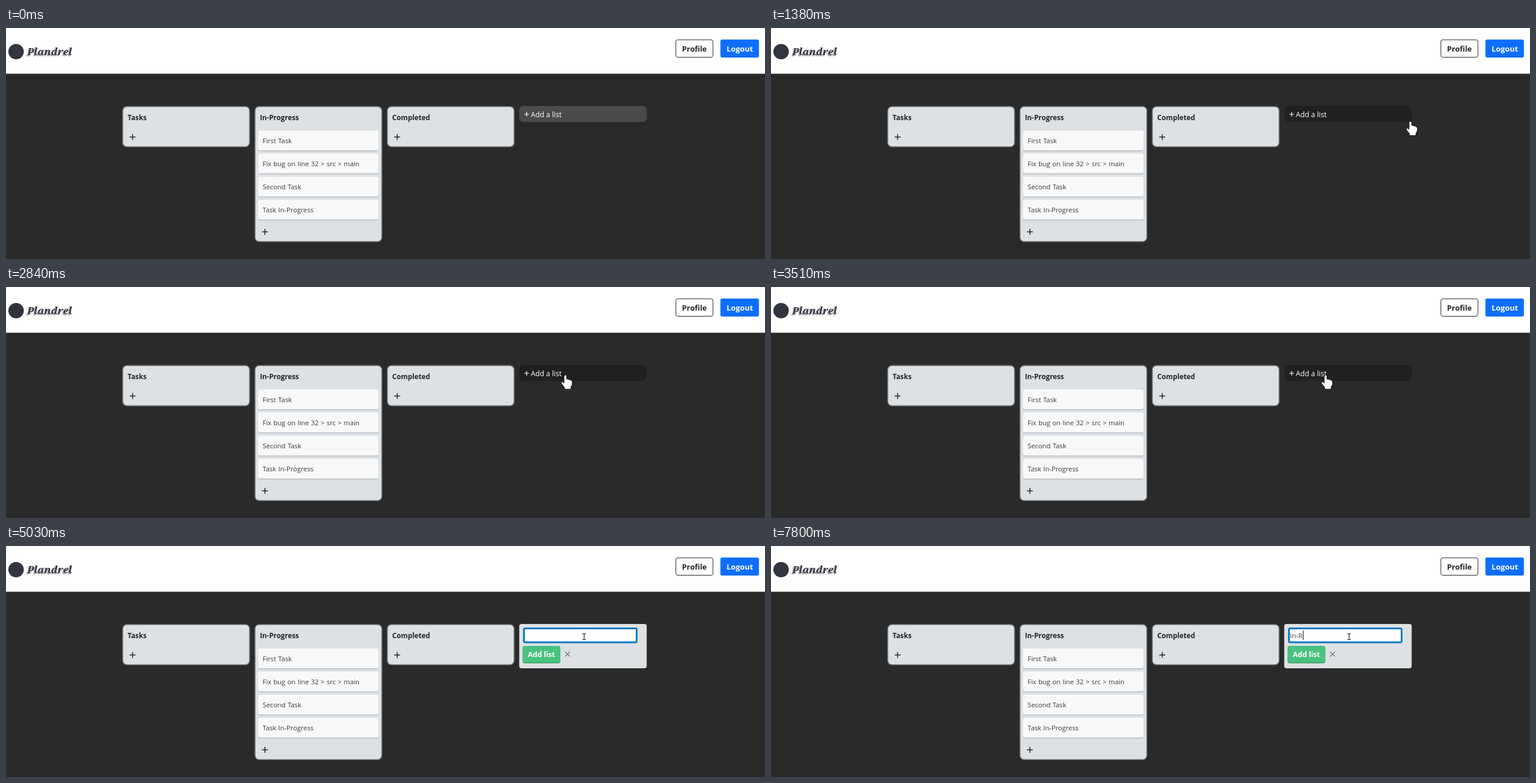
Recreate the animation shown at these times as an HTML page with a canvas. Size 1280 by 391 pixels, loop 7990 ms.

```html
<!DOCTYPE html>
<html lang="en">
<head>
<meta charset="utf-8">
<title>Task board</title>
<style>
  html, body { margin: 0; width: 100%; height: 100%; overflow: hidden; background: #2a2a2a; }
  canvas { display: block; }
</style>
</head>
<body>
<canvas id="stage" width="1280" height="391"></canvas>
<script>
const ctx = document.getElementById('stage').getContext('2d');
const LOOP = 7990;
const ENTER = 920, CLICK = 4100, OPEN = 4240;
const INK = '#212529', PANEL = '#dde1e4';
const SANS = '"Open Sans", "Noto Sans", sans-serif';

// Pointer path: time, x, y of the hot spot
const PATH = [
  [920, 1268, 186], [1190, 1140, 166], [1450, 1055, 155], [1710, 996, 149],
  [1780, 988, 149], [2040, 971, 149], [2200, 971, 149], [2240, 969, 149],
  [2390, 969, 149], [2840, 943, 149], [3110, 925, 149], [3390, 925, 149],
  [3440, 923, 148], [3700, 967, 153], [4060, 967, 153], [4100, 973, 153]
];

// Input contents: start time, text, caret shown
const TYPING = [
  [OPEN, '', 1], [5030, '', 0], [5420, '', 1], [5750, '', 0], [6150, '', 1],
  [6340, 'I', 1], [6550, 'In', 1], [6940, 'In', 0],
  [7400, 'In-', 1], [7600, 'In-', 0], [7800, 'In-R', 1]
];

function box(x, y, w, h, r, fill, stroke, line = 1) {
  ctx.beginPath();
  ctx.roundRect(x, y, w, h, r);
  if (fill) { ctx.fillStyle = fill; ctx.fill(); }
  if (stroke) { ctx.strokeStyle = stroke; ctx.lineWidth = line; ctx.stroke(); }
}

function text(str, x, y, size, color = INK, weight = 400, align = 'left') {
  ctx.font = `${weight} ${size}px ${SANS}`;
  ctx.textAlign = align;
  ctx.fillStyle = color;
  ctx.fillText(str, x, y);
}

function lines(color, width, ...segments) {
  ctx.strokeStyle = color;
  ctx.lineWidth = width;
  ctx.beginPath();
  for (const [x1, y1, x2, y2] of segments) { ctx.moveTo(x1, y1); ctx.lineTo(x2, y2); }
  ctx.stroke();
}

function plus(x, y, r, color, width) {
  lines(color, width, [x - r, y, x + r, y], [x, y - r, x, y + r]);
}

function header() {
  ctx.fillStyle = '#fff';
  ctx.fillRect(0, 0, 1280, 77.4);
  ctx.fillStyle = '#343440';
  ctx.beginPath();
  ctx.arc(17, 40, 13, 0, Math.PI * 2);
  ctx.fill();
  ctx.font = 'italic 700 17px "Noto Serif", serif';
  ctx.textAlign = 'left';
  ctx.fillStyle = '#aaa8ac';
  ctx.fillText('Plandrel', 34, 48);
  ctx.fillStyle = '#343440';
  ctx.fillText('Plandrel', 36, 46);

  box(1129.7, 20, 62.5, 29.5, 3, '#fff', INK);
  text('Profile', 1161, 39.6, 12.8, INK, 700, 'center');
  box(1204.8, 19.6, 65, 30.4, 3, '#0d6efd');
  text('Logout', 1237.5, 39.6, 12.9, '#fff', 700, 'center');
}

function column(x, title, cards = []) {
  const h = cards.length ? 228.5 : 68;
  box(x + 0.4, 133, 213.8, h, 7, PANEL, '#757b80', 1.6);
  text(title, x + 8.6, 156, 11.8, INK, 700);
  ctx.wordSpacing = '0.6px';
  cards.forEach((label, i) => {
    const y = 173.5 + i * 39.1;
    box(x + 5.5, y + 1, 203, 34, 3, '#b7bec4');
    box(x + 5.5, y, 203, 33.5, 3, '#f8f8f8');
    text(label, x + 13.2, y + 21, 11.3, '#363a3e');
  });
  ctx.wordSpacing = '0px';
  plus(x + 17, cards.length ? 345 : 184.5, 5, INK, 1.5);
}

function addBar(hover) {
  box(865.5, 132, 215, 27, 7, hover ? '#202020' : '#4a4a4a');
  plus(878, 146, 4, '#fff', 1.2);
  text('Add a list', 885, 150.5, 12.2, '#fff', 500);
}

// Word suggestions floating above the caret
function suggestions(x, width, words) {
  box(x + 0.5, 110.5, width - 1, 32, 0, '#f2f2f2', '#c8c8c8');
  words.forEach((word, i) =>
    text(word, x + width * (i + 0.5) / words.length, 131, 12.5, '#1a1a1a', 400, 'center'));
}

function addForm(t) {
  box(865.5, 132, 215, 75, 4, PANEL);
  box(873.5, 139.5, 190, 23.5, 2, '#fff', '#0b79bf', 3);
  box(871, 170, 64, 28.5, 4, '#3b9a62');
  box(871, 169, 64, 28, 4, '#49c280');
  text('Add list', 903, 187.5, 12.2, '#fff', 700, 'center');
  if (t >= 4630) lines('#70757a', 1.3, [943, 179, 951, 187], [951, 179, 943, 187]);

  const [, typed, caret] = TYPING.findLast(([start]) => t >= start);
  text(typed, 875.3, 156, 11.5, '#3c4043');
  if (caret) {
    const x = Math.round(875.5 + ctx.measureText(typed).width);
    ctx.fillStyle = '#111';
    ctx.fillRect(x, 143, 1, 16);
  }
  if (t >= 6410 && t < 6800) suggestions(877, 124, ['I', "I'm", 'It']);
  else if (t >= 6800 && t < 7400) suggestions(884, 130, ['In', 'Into', 'Inside']);

  const beam = [[972, 148.5, 978, 148.5], [975, 148.5, 975, 158.5], [972, 158.5, 978, 158.5]];
  lines('#222', 1.2, ...beam);
}

function pointerAt(t) {
  const i = PATH.findIndex(([start]) => start > t);
  if (i < 0) return PATH.at(-1).slice(1);
  const [t0, x0, y0] = PATH[i - 1], [t1, x1, y1] = PATH[i];
  const k = (t - t0) / (t1 - t0);
  return [Math.round(x0 + (x1 - x0) * k), Math.round(y0 + (y1 - y0) * k)];
}

const ARROW = new Path2D('M0 0V20L4.6 15.8L7.6 23L11 21.6L8 14.6H14Z');
const HAND = new Path2D('M-2 2Q-2 0 .3 0Q2.6 0 2.6 2V7Q4.8 6 6.3 8Q8.3 7 9.6 9' +
  'Q12 8.4 12 11.5V16L9.8 20V24H-1.2V21L-6.2 14.5Q-7.2 12 -5.2 11.5Q-3.7 11.5 -2 13.5Z');

function pointer(x, y, shape) {
  ctx.save();
  ctx.translate(x, y);
  ctx.strokeStyle = '#111';
  ctx.lineWidth = 1;
  ctx.fillStyle = '#fff';
  ctx.fill(shape);
  ctx.stroke(shape);
  ctx.restore();
}

function draw(t) {
  ctx.fillStyle = '#2a2a2a';
  ctx.fillRect(0, 0, 1280, 391);
  header();
  column(196.5, 'Tasks');
  column(419.6, 'In-Progress',
    ['First Task', 'Fix bug on line 32 > src > main', 'Second Task', 'Task In-Progress']);
  column(642.7, 'Completed');

  if (t >= OPEN) return addForm(t);
  if (t < ENTER) return addBar(false);

  const [x, y] = pointerAt(t);
  const hover = x < 1081 && y < 159;
  addBar(hover);
  if (t >= CLICK) {
    ctx.fillStyle = '#908a10';
    ctx.beginPath();
    ctx.arc(973, 152.5, 9.7, 0, Math.PI * 2);
    ctx.fill();
  }
  pointer(x, y, hover ? HAND : ARROW);
}

const began = performance.now();
function tick() {
  draw((performance.now() - began) % LOOP);
  requestAnimationFrame(tick);
}
tick();
</script>
</body>
</html>
```
